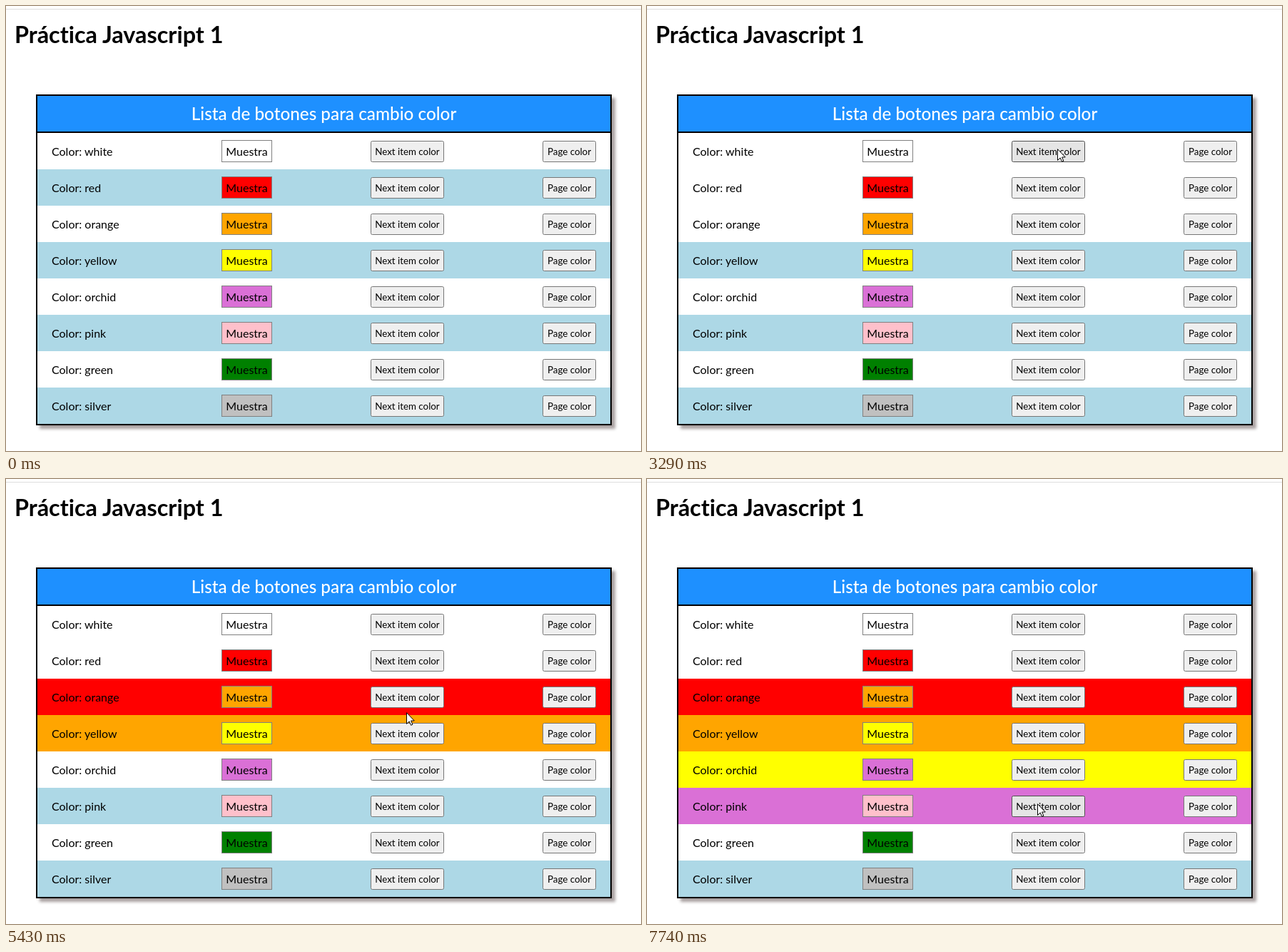
Animation, 890 px wide and 624 px high, one loop 8000 ms. Source, as an HTML page:

```html
<!DOCTYPE html>
<html lang="es">
<head>
<meta charset="utf-8">
<title>Práctica Javascript 1</title>
<style>
  html, body { margin: 0; width: 100%; height: 100%; overflow: hidden; background: #fff; }
  body {
    position: relative; font: 16px Lato, sans-serif; font-variant-ligatures: none;
    color: #000; cursor: default;
  }
  hr { position: absolute; top: 4px; left: 0; width: 100%; height: 1px; margin: 0; border: 0; background: #dedede; }
  h1 { position: absolute; left: 12px; top: 21px; margin: 0; font-size: 32.4px; line-height: 38px; white-space: nowrap; }
  #list {
    position: absolute; left: 42px; top: 124px; width: 803px; height: 460px;
    border: 2px solid #000; box-shadow: 5px 5px 4px #aaa2a2;
  }
  h2 {
    margin: 0; height: 50px; border-bottom: 2px solid #000; background: dodgerblue; color: #fff;
    font-size: 24.3px; font-weight: 500; line-height: 50px; text-align: center;
  }
  .row { position: relative; height: 51px; white-space: nowrap; }
  .row > * { position: absolute; box-sizing: border-box; }
  .name { left: 20px; top: 16px; line-height: 19px; }
  .sample {
    left: 258px; top: 10px; width: 71px; height: 31px;
    border: 1px solid gray; line-height: 29px; text-align: center;
  }
  .btn {
    top: 11px; height: 30px; border: 1px solid #767676; border-radius: 2.5px;
    background: #efefef; font-size: 13.333px; line-height: 28px; text-align: center;
  }
  .next { left: 467px; width: 103px; }
  .page { left: 708px; width: 75px; }
  .hover { background: #e5e5e5; border-color: #4f4f4f; }
  .active { background: #f5f5f5; border-color: #8d8d8d; }
  #arrow { position: absolute; left: 0; top: 0; width: 12px; height: 19px; overflow: visible; }
</style>
</head>
<body>
<hr>
<h1>Práctica Javascript 1</h1>
<div id="list"><h2>Lista de botones para cambio color</h2></div>
<svg id="arrow" viewBox="0 0 12 19">
  <path d="M.5 .7V16.4L4.2 12.9L6.6 18.3L8.9 17.3L6.6 12H11.3Z" fill="#fff" stroke="#000"/>
</svg>
<script>
const LOOP = 8000, HOLD = 80;
const colors = ['white', 'red', 'orange', 'yellow', 'orchid', 'pink', 'green', 'silver'];

// pointer moves; ex and ey above 1 slow down towards the stop, below 1 speed up
const entry = { x: 830, y: 655 };
const moves = [
  { from: 660, to: 1580, x: 620, y: 129, ex: 2, ey: 3.5 },
  { from: 1990, to: 2980, x: 575, y: 200, ex: 2, ey: 1.2, click: 3290 },
  { from: 3340, to: 4080, x: 570, y: 251, ex: 1, ey: .55, click: 4080 },
  { from: 4210, to: 4640, x: 566, y: 306, ex: 1, ey: 3.2, click: 5130 },
  { from: 5130, to: 5890, x: 553, y: 358, ex: 1, ey: 1, click: 6350 },
  { from: 6530, to: 6910, x: 550, y: 408, ex: 1, ey: 1.5, click: 7280 },
  { from: 7410, to: 7740, x: 547, y: 455, ex: 1, ey: 1.5 }
];
const clicks = moves.filter(m => m.click).map(m => m.click);

const list = document.getElementById('list');
const arrow = document.getElementById('arrow');

function add(parent, cls, text = '') {
  const el = document.createElement('div');
  el.className = cls;
  el.textContent = text;
  return parent.appendChild(el);
}

const rows = colors.map((color, i) => {
  const el = add(list, 'row');
  add(el, 'name', 'Color: ' + color);
  add(el, 'sample', 'Muestra').style.background = color;
  const buttons = [add(el, 'btn next', 'Next item color'), add(el, 'btn page', 'Page color')];
  return { el, buttons, base: i % 2 ? 'lightblue' : 'white' };
});

const ease = (p, k) => 1 - (1 - p) ** k;

function pointerAt(t) {
  let { x, y } = entry;
  for (const m of moves) {
    if (t < m.from) break;
    const p = Math.min(1, (t - m.from) / (m.to - m.from));
    x += (m.x - x) * ease(p, m.ex);
    y += (m.y - y) * ease(p, m.ey);
  }
  return [Math.round(x), Math.round(y)];
}

function isOver(el, x, y) {
  const box = el.getBoundingClientRect();
  return x >= box.left && x < box.right && y >= box.top && y < box.bottom;
}

function draw(t) {
  const [x, y] = pointerAt(t);
  const pressed = clicks.some(c => t >= c - HOLD && t < c);
  arrow.style.transform = `translate(${x}px, ${y}px)`;
  rows.forEach((row, i) => {
    // each click hands its row's color to the row below
    row.el.style.background = t >= clicks[i - 1] ? colors[i - 1] : row.base;
    for (const button of row.buttons) {
      const over = isOver(button, x, y);
      button.classList.toggle('hover', over);
      button.classList.toggle('active', over && pressed);
    }
  });
}

const start = performance.now();
function tick() {
  draw((performance.now() - start) % LOOP);
  requestAnimationFrame(tick);
}
tick();
</script>
</body>
</html>
```
